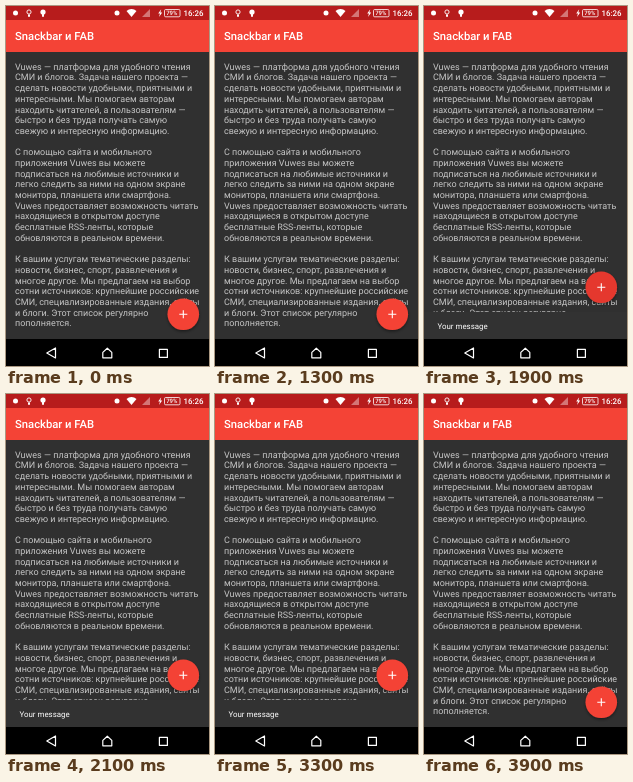
Animation of 203 by 360 pixels, one loop 4000 ms. Source, as an HTML page:

```html
<!DOCTYPE html>
<html lang="ru">
<head>
<meta charset="utf-8">
<style>
html, body { margin: 0; width: 100%; height: 100%; overflow: hidden; background: #303030; }
svg { display: block; width: 203px; height: 360px; font-family: Roboto, sans-serif; fill: #fff; }
text { text-rendering: geometricPrecision; }
</style>
</head>
<body>
<svg viewBox="0 0 203 360">
  <defs>
    <filter id="shade" x="-30%" y="-30%" width="160%" height="170%">
      <feDropShadow dx="0" dy="1.5" stdDeviation="1.5" flood-opacity=".45"/>
    </filter>
  </defs>

  <rect width="203" height="360" fill="#303030"/>
  <g id="article" font-size="9" fill="#c5c5c5"></g>

  <rect width="203" height="46" fill="#f44336"/>
  <text x="9" y="34" font-size="11.25" font-weight="500">Snackbar и FAB</text>

  <!-- status bar -->
  <rect width="203" height="14" fill="#b71c1c"/>
  <circle cx="9.5" cy="7" r="2.5"/>
  <circle cx="23" cy="6" r="2.1" fill="none" stroke="#fff" stroke-width=".9"/>
  <path d="M22 8.5h2v2.2h-2z"/>
  <circle cx="37" cy="6" r="2.6"/>
  <path d="M36 8h2v2.7h-2z"/>
  <circle cx="111" cy="7" r="2.5"/>
  <path d="M125.5 11l-5-6a7.5 7.5 0 0 1 10 0z"/>
  <path d="M136 11h8v-8z" opacity=".4"/>
  <path d="M155.2 3.2l-3 4.3h1.8l-1 3.6 3.2-4.6h-1.8z"/>
  <rect x="158.5" y="3.5" width="15.5" height="7.3" rx="1.2" fill="none" stroke="#fff" stroke-width=".8"/>
  <text x="160.2" y="9.3" font-size="6" font-weight="500">79%</text>
  <text x="177.5" y="10" font-size="7.9" font-weight="500">16:26</text>

  <g id="bar">
    <rect y="306" width="203" height="28" fill="#323232"/>
    <text id="message" x="13.5" y="322.5" font-size="7.9">Your message</text>
  </g>

  <g id="fab">
    <circle id="disc" cx="177.3" cy="308.25" r="15.75" filter="url(#shade)"/>
    <path d="M173.3 308.25h8M177.3 304.25v8" stroke="#fff" stroke-width="1.1"/>
  </g>

  <!-- navigation bar -->
  <rect y="333" width="203" height="27" fill="#000"/>
  <g fill="none" stroke="#fff" stroke-width="1.2" stroke-linejoin="round">
    <path d="M49.5 342v10l-8.7-5z"/>
    <path d="M96.8 351.8v-5.4l4.5-4.2 4.5 4.2v5.4z"/>
    <rect x="153.4" y="343.4" width="8" height="8"/>
  </g>
</svg>
<script>
const $ = id => document.getElementById(id);
const clamp = v => Math.min(1, Math.max(0, v));
const LOOP = 4000, STEP = 100, SLIDE = 250, RISE = 27;
const SHOW = 1620, HIDE = 3443;

const lines = `Vuwes — платформа для удобного чтения
СМИ и блогов. Задача нашего проекта —
сделать новости удобными, приятными и
интересными. Мы помогаем авторам
находить читателей, а пользователям —
быстро и без труда получать самую
свежую и интересную информацию.

С помощью сайта и мобильного
приложения Vuwes вы можете
подписаться на любимые источники и
легко следить за ними на одном экране
монитора, планшета или смартфона.
Vuwes предоставляет возможность читать
находящиеся в открытом доступе
бесплатные RSS-ленты, которые
обновляются в реальном времени.

К вашим услугам тематические разделы:
новости, бизнес, спорт, развлечения и
многое другое. Мы предлагаем на выбор
сотни источников: крупнейшие российские
СМИ, специализированные издания, сайты
и блоги. Этот список регулярно
пополняется.`.split("\n");
$("article").innerHTML = lines
  .map((s, i) => `<text x="9" y="${63.8 + i * 10.69}">${s}</text>`).join("");

// cubic-bezier(.4, 0, .2, 1), solved for x by bisection
function ease(x) {
  let lo = 0, hi = 1;
  for (let i = 0; i < 20; i++) {
    const u = (lo + hi) / 2, v = 1 - u;
    if (1.2 * u * v * v + .6 * u * u * v + u ** 3 < x) lo = u; else hi = u;
  }
  return 3 * lo * lo * (1 - lo) + lo ** 3;
}
const slide = (t, start) => ease(clamp((t - start) / SLIDE));
const mix = (a, b, k) => Math.round(a + (b - a) * k);

function draw(now) {
  const t = Math.floor(now % LOOP / STEP) * STEP;
  const up = slide(t, SHOW) - slide(t, HIDE);
  const alpha = clamp((t - SHOW - 70) / 180) - clamp((t - HIDE) / 180);
  const press = clamp((t - 1400) / 200) * clamp((2000 - t) / 300);
  $("fab").setAttribute("transform", `translate(0 ${-RISE * up})`);
  $("bar").setAttribute("transform", `translate(0 ${RISE * (1 - up)})`);
  $("message").setAttribute("opacity", alpha);
  $("disc").setAttribute("fill",
    `rgb(${mix(244, 198, press)},${mix(67, 30, press)},${mix(54, 27, press)})`);
}

const start = performance.now();
function tick() {
  draw(performance.now() - start);
  requestAnimationFrame(tick);
}
draw(0);
requestAnimationFrame(tick);
</script>
</body>
</html>
```
